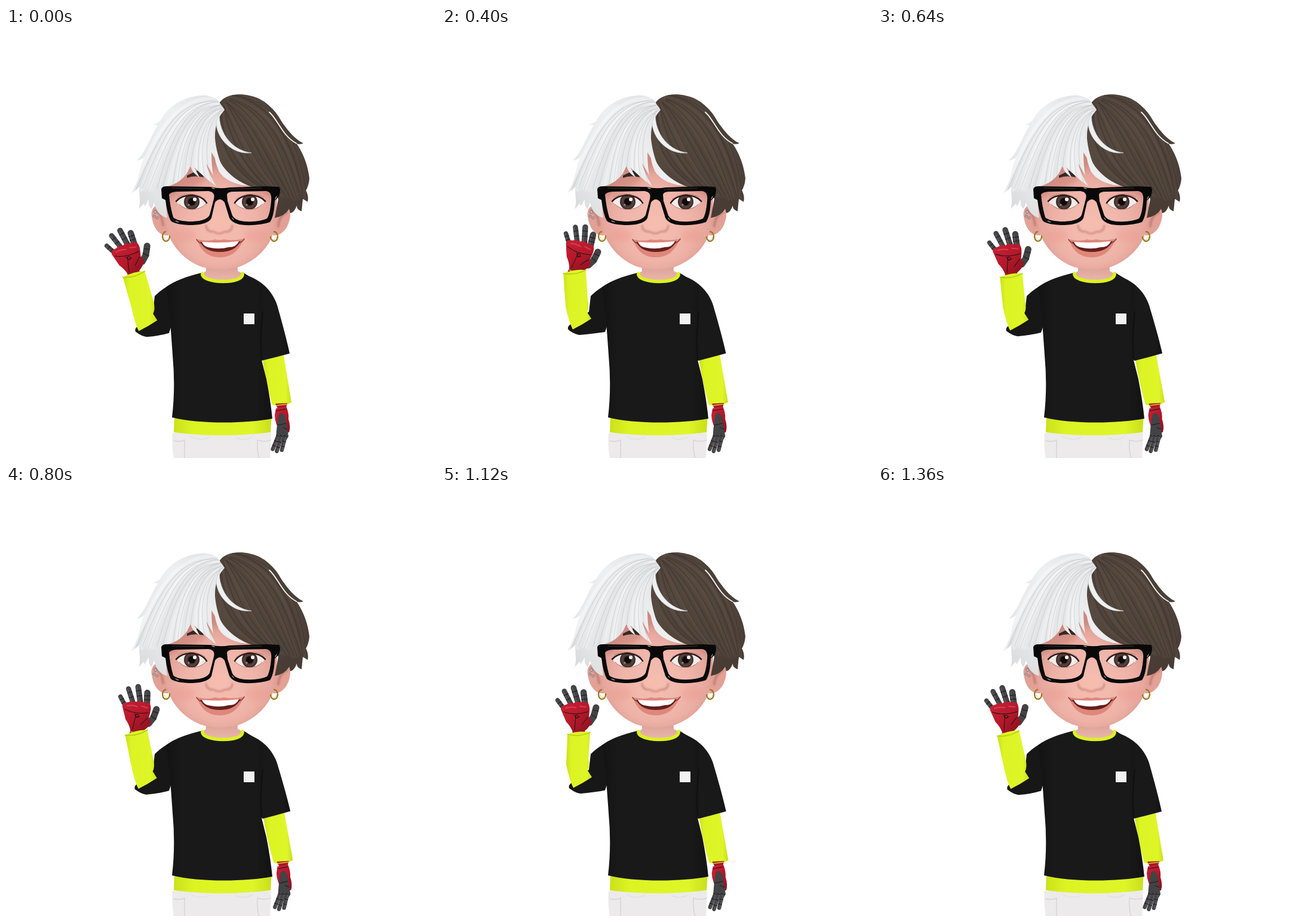
An HTML page for the animation above (1440 ms loop, 720 by 720 pixels).

```html
<!DOCTYPE html>
<html lang="en">
<head>
<meta charset="utf-8">
<title>Waving avatar</title>
<style>
  html, body { margin: 0; width: 100%; height: 100%; overflow: hidden; background: #fff; }
  svg { display: block; width: 100vw; height: 100vh; }
  .lime { fill: url(#lime); }
  .finger { fill: none; stroke: #434346; stroke-linecap: round; stroke-linejoin: round; }
  .seam { fill: none; stroke: #1d1517; stroke-width: 1; }
  .line { fill: none; stroke-linecap: round; }
</style>
</head>
<body>
<svg viewBox="0 0 720 720">
  <defs>
    <linearGradient id="lime">
      <stop offset="0" stop-color="#cbe01a"/><stop offset=".2" stop-color="#dcf423"/>
      <stop offset=".8" stop-color="#def628"/><stop offset="1" stop-color="#c9de1b"/>
    </linearGradient>
    <radialGradient id="skin" gradientUnits="userSpaceOnUse" cx="358" cy="330" r="108">
      <stop offset="0" stop-color="#f5bfb2"/><stop offset=".55" stop-color="#efb4a9"/>
      <stop offset=".8" stop-color="#e6a79d"/><stop offset="1" stop-color="#d6958c"/>
    </radialGradient>
    <linearGradient id="neck" x2="0" y2="1">
      <stop offset="0" stop-color="#c98b83"/><stop offset=".6" stop-color="#e0a89e"/><stop offset="1" stop-color="#ebb7ab"/>
    </linearGradient>
    <linearGradient id="white" x1="1" y1="0" x2="0" y2="1">
      <stop offset="0" stop-color="#dcdee0"/><stop offset=".35" stop-color="#eeeff0"/>
      <stop offset=".7" stop-color="#e6e8e9"/><stop offset="1" stop-color="#d3d6d8"/>
    </linearGradient>
    <linearGradient id="brown" x2=".6" y2="1">
      <stop offset="0" stop-color="#4c4038"/><stop offset=".35" stop-color="#574a40"/><stop offset="1" stop-color="#483c34"/>
    </linearGradient>
    <linearGradient id="cloth">
      <stop offset="0" stop-color="#131313"/><stop offset=".15" stop-color="#191919"/>
      <stop offset=".85" stop-color="#191919"/><stop offset="1" stop-color="#121212"/>
    </linearGradient>
    <linearGradient id="red" x2="1" y2="1">
      <stop offset="0" stop-color="#c92136"/><stop offset=".5" stop-color="#b6192b"/><stop offset="1" stop-color="#85101d"/>
    </linearGradient>
    <radialGradient id="iris">
      <stop offset=".3" stop-color="#2b1d1b"/><stop offset=".7" stop-color="#5a4540"/><stop offset="1" stop-color="#33231f"/>
    </radialGradient>
    <filter id="soft" x="-50%" y="-50%" width="200%" height="200%"><feGaussianBlur stdDeviation="5"/></filter>
    <filter id="mild" x="-50%" y="-50%" width="200%" height="200%"><feGaussianBlur stdDeviation="1.4"/></filter>
    <path id="faceShape" d="M266 230C262 290 265 322 271 342C278 366 300 390 328 400Q358 409 390 400C420 389 441 366 448 342C454 318 456 280 450 230Q360 150 266 230Z"/>
    <path id="whiteShape" d="M358 126C348 108 318 110 293 122C273 132 263 147 258 156Q252 160 246 162L254 163C242 181 235 207 219 222Q229 220 233 215C222 233 227 249 210 276Q219 271 224 265C221 275 227 290 222 303L231 294L232 299L239 287Q238 299 244 303L248 292Q252 313 270 318Q267 295 268 284L263 266Q288 264 303 243L309 231Q312 243 324 250L315 233Q332 250 352 265Q338 242 335 226L347 247Q344 230 344 208Q357 228 356 240L366 243Q352 210 350 185Q349 155 366 137Z"/>
    <path id="brownShape" d="M357 126C367 109 399 107 425 119C447 131 461 151 467 171C492 194 505 223 508 252Q507 264 502 272Q507 281 505 291L497 286Q496 296 495 307Q486 304 487 297Q483 309 476 310L474 303Q467 315 450 318L456 286L445 268L433 273Q382 259 364 233C348 213 347 182 351 162Q354 147 365 137Z"/>
    <clipPath id="faceClip"><use href="#faceShape"/></clipPath>
    <clipPath id="whiteClip"><use href="#whiteShape"/></clipPath>
    <clipPath id="brownClip"><use href="#brownShape"/></clipPath>
  </defs>

  <!-- trousers and shirt -->
  <path fill="#eceaea" d="M279 678H444L442 720H281Q277 700 279 678Z"/>
  <g class="line" stroke="#d8d5d5" stroke-width="1.5">
    <path d="M281 691Q290 694 299 690V720M421 690Q433 694 443 690M421 690Q420 710 424 720"/>
    <path d="M310 684Q320 692 340 686M385 686Q398 692 412 685" opacity=".5"/>
  </g>
  <path class="lime" d="M282 648L281 677Q360 687 443 677L445 648Z"/>

  <g id="sideArm">
    <path class="lime" d="M429 550L464 543Q471 585 478 627Q463 635 446 631Q436 598 429 550Z"/>
    <path d="M451 629L471 628L469 635L455 637Z" fill="#a01525"/>
    <path class="line" d="M453 632L470 630" stroke="#d6a22d" stroke-width="2"/>
    <path fill="url(#red)" d="M452 637L469 633Q474 645 473 655Q477 668 474 677L462 680Q450 664 450 648Z"/>
    <path fill="#434346" d="M457 647Q464 641 468 652L473 684L468 692L452 688Q453 665 457 647Z"/>
    <g id="restFingers"></g>
    <path class="seam" d="M452 641L469 638M464 669L471 672M455 665L469 662"/>
    <path fill="url(#cloth)" d="M403 414C434 425 448 446 454 464Q468 513 475 545Q453 551 428 557L398 470Z"/>
  </g>

  <path id="upperArm" fill="#171717"/>
  <path fill="url(#cloth)" d="M327 410C303 416 282 423 268 434C273 464 276 504 279 548Q284 602 278 652C320 663 400 663 446 654Q443 624 436 588L428 556L430 430L398 410Q365 437 327 410Z"/>
  <path class="line" d="M430 475Q425 515 428 555" stroke="#101010" stroke-width="2"/>
  <rect x="398" y="478" width="18" height="18" fill="#f2f2f2"/>

  <!-- neck -->
  <path fill="url(#neck)" d="M334 382H387L388 407Q398 411 396 415Q363 432 329 415Q328 411 335 407Z"/>
  <path class="line" d="M329 411C326 428 399 430 396 411" stroke="#d9f222" stroke-width="5.5"/>

  <!-- ears -->
  <path fill="#e3a196" d="M270 302C253 289 241 301 244 316C247 337 258 349 272 347Z"/>
  <path fill="#e3a196" d="M449 311C466 295 477 300 476 314C474 335 461 349 447 347Z"/>
  <path class="line" d="M250 305Q261 311 263 330M470 309Q457 315 456 332" stroke="#c27f76" stroke-width="4" filter="url(#mild)"/>
  <g fill="#b9bcc3" stroke="#696469" stroke-width=".8">
    <circle cx="250" cy="308" r="2.5"/><circle cx="248" cy="315" r="2"/><circle cx="253" cy="318" r="2"/>
  </g>

  <!-- face -->
  <use href="#faceShape" fill="url(#skin)"/>
  <g clip-path="url(#faceClip)" filter="url(#soft)">
    <path d="M260 225Q350 180 455 225L452 284Q385 268 350 230Q330 272 265 284Z" fill="#c47c72" opacity=".5"/>
    <ellipse cx="298" cy="348" rx="19" ry="12" fill="#ec9a8f" opacity=".45"/>
    <ellipse cx="420" cy="348" rx="19" ry="12" fill="#ec9a8f" opacity=".45"/>
    <path d="M274 350Q300 407 358 407Q418 407 446 350L450 410H270Z" fill="#c8877f" opacity=".4"/>
  </g>
  <path d="M303 247L326 236L331 250Q315 246 303 251Z" fill="#342923"/>
  <g id="eyes"></g>
  <path d="M335 331Q336 342 348 341Q357 347 366 341Q378 342 379 331" class="line" stroke="#c67a70" stroke-width="3" opacity=".7" filter="url(#mild)"/>
  <ellipse cx="357" cy="326" rx="14" ry="11" fill="#f6bcae" filter="url(#mild)"/>
  <path fill="#df877b" d="M320 354Q339 358 350 354Q357 356 365 354Q380 357 398 353C390 374 377 384 358 384C339 384 326 374 320 354Z"/>
  <path fill="#65201c" d="M325 358Q358 362 393 357C386 370 374 375 358 375C342 375 331 370 325 358Z"/>
  <path fill="#fff" d="M328 358Q358 361 390 357Q386 367 373 367Q358 371 343 368Q331 367 328 358Z"/>
  <path class="line" d="M319 354Q322 359 327 361M399 353Q396 358 391 360" stroke="#93423c" stroke-width="1.5"/>
  <g class="line" stroke-width="2.4" stroke="#9b7b28">
    <path d="M267 341A6 8 0 1 0 274 348"/><path d="M449 341A6 8 0 1 1 443 350"/>
    <path d="M265 350Q267 357 272 354M453 350Q450 357 446 354" stroke="#dfc66b" stroke-width="1"/>
  </g>

  <!-- hair -->
  <use href="#brownShape" fill="url(#brown)"/>
  <g id="brownHair" clip-path="url(#brownClip)"></g>
  <path fill="#4b4037" d="M430 122C459 143 469 179 498 193Q490 197 480 190C463 177 458 155 430 122Z"/>
  <path class="line" d="M441 141C455 153 463 181 486 193" stroke="#f4f4f4" stroke-width="1.8"/>
  <use href="#whiteShape" fill="url(#white)"/>
  <g id="whiteHair" clip-path="url(#whiteClip)"></g>
  <path d="M358 138C353 169 375 205 411 209C378 213 352 184 352 158Z" fill="#eef0f1" stroke="#c9cccf" stroke-width=".7"/>
  <path d="M350 190C350 220 368 247 405 264C385 263 366 254 358 242C350 228 347 210 350 190Z" fill="#eceeef"/>

  <!-- glasses -->
  <path fill="#090909" fill-rule="evenodd" d="M260 270Q261 265 269 265L342 266Q358 270 374 267L436 265L457 266Q461 269 457 282L450 289Q449 315 442 325Q425 331 400 330Q380 329 374 318L366 292Q358 282 350 292L344 318Q339 329 312 330Q285 330 276 323Q270 312 267 288L261 285Z
    M273 279Q275 275 285 274L339 273Q351 275 348 286L341 313Q336 323 312 324Q287 324 280 317Q275 300 273 279Z
    M370 279Q371 274 382 274L435 273Q446 274 444 290Q442 312 437 319Q425 325 402 324Q384 323 379 314L371 290Z"/>
  <path class="line" d="M278 268L331 269M372 270L428 268" stroke="#343434"/>
  <g class="line" stroke="#ddd"><path d="M345 268L349 269M451 286L453 282M284 323L289 325M379 318L381 321"/></g>

  <!-- raised arm -->
  <g id="hand">
    <path d="M-10 -5H10L12 6H-11Z" fill="#8f1421"/>
    <path class="line" d="M-9 0Q0 3 9 0" stroke="#cf9a2c" stroke-width="2"/>
    <g id="fingers"></g>
    <g id="thumb">
      <path class="finger" stroke-width="11" d="M18 -18L25 -28L29 -43"/>
      <path class="seam" d="M20 -32L30 -26M24 -39L33 -37"/>
    </g>
    <path fill="url(#red)" d="M-30 -40Q-29 -47 -21 -48L-16 -51L-9 -50Q-4 -55 2 -52L14 -52Q19 -47 18 -37L17 -27L22 -20Q18 -10 10 -4Q0 -1 -10 -2Q-14 -12 -21 -19Z"/>
    <path class="seam" d="M-26 -36Q-8 -29 16 -36M-5 -31L-7 -4M15 -27L5 -14M-8 -31L-3 -25L2 -28"/>
    <circle cx="-3" cy="-28" r="2.5" class="seam"/>
    <path class="line" d="M-22 -42Q-14 -45 -5 -43M2 -45L12 -44" stroke="#ef6575" stroke-width="2" opacity=".5"/>
  </g>
  <path id="forearm" class="lime"/>
  <path id="cuff" class="line" stroke="#b4c716" stroke-width="1.5"/>
</svg>
<script>
const STEP = 80, LOOP = 1440;
// turning points of the wave: time, wrist x, hand tilt
const wave = [
  [0, 214, -11], [240, 229, 0], [400, 222, 20], [560, 212, -12], [640, 223, -1],
  [800, 218, 9], [960, 206, -13], [1120, 229, 0], [1360, 218, -1], [LOOP, 214, -11]
];
const $ = id => document.getElementById(id);
const add = (id, markup) => $(id).insertAdjacentHTML('beforeend', markup);
const mix = (a, b, k) => a + (b - a) * k;

let seed = 7;
const random = () => (seed = seed * 16807 % 2147483647) / 2147483647;

// soft strands blended between two cubic curves, with fine lines on top
function hair(id, a, b, tones, crease) {
  const strand = (k, color, width, alpha) => {
    const p = a.map((v, j) => (mix(v, b[j], k) + random() * 6 - 3).toFixed(1));
    return `<path class="line" d="M${p[0]} ${p[1]}C${p.slice(2)}" stroke="${color}" stroke-width="${width}" opacity="${alpha}"/>`;
  };
  let wide = '', fine = '';
  for (let i = 0; i < 24; i++) {
    wide += strand((i + random()) / 24, tones[i % tones.length], 4 + 4 * random(), .5);
    if (i % 2) fine += strand(i / 24, crease, 1.2, .6);
  }
  add(id, `<g filter="url(#mild)">${wide}</g>${fine}`);
}

function eye(x, dir) {
  add('eyes', `<g transform="translate(${x} 292) scale(${dir} 1)">
    <path d="M-25 -1C-14 -15 14 -16 25 1C15 16 -13 17 -25 -1Z" fill="#f3ebe9"/>
    <circle cy="-1" r="13" fill="url(#iris)"/><circle cy="-1" r="6" fill="#110b0b"/>
    <path class="line" d="M-26 -2C-14 -15 14 -16 25 1" stroke="#2a1916" stroke-width="2.6"/>
    <path class="line" d="M-21 3C-11 15 13 15 24 2" stroke="#a8675e"/>
    <path class="line" d="M-23 -9Q0 -20 22 -6" stroke="#bd766d" stroke-width="1.3" opacity=".7"/></g>
    <circle cx="${x + 5}" cy="287" r="3" fill="#fff"/><circle cx="${x - 5}" cy="296" r="1.6" fill="#a58c84"/>`);
}

function finger(id, x, y, angle, length, width) {
  const joints = [.05, .42, .75].map(k => `M${-width / 2} ${-length * k}h${width}`).join('');
  add(id, `<g transform="translate(${x} ${y}) rotate(${angle})">
    <path class="finger" stroke-width="${width}" d="M0 0V${-length}"/>
    <path class="line" stroke="#5b5b5f" stroke-width="1.5" d="M${-width / 5} 0V${-length}"/>
    <path class="seam" d="${joints}"/></g>`);
}

function build() {
  eye(311, 1);
  eye(408, -1);
  hair('whiteHair', [357, 121, 290, 112, 252, 170, 210, 272], [362, 140, 335, 160, 330, 215, 354, 265],
    ['#fff', '#d6d9db', '#f6f7f7', '#e3e5e7'], '#c3c7ca');
  hair('brownHair', [360, 135, 345, 190, 365, 245, 436, 274], [380, 112, 470, 120, 500, 200, 508, 290],
    ['#62554b', '#453a32', '#5b4e44', '#4c4138'], '#3a3029');
  for (let i = 0; i < 4; i++)
    finger('fingers', -24 + 11.5 * i, -40 - 11 * Math.sin(i * .75), -37 + 10 * i, 19 + 8 * Math.sin(i), 7.5 + i);
  for (let i = 0; i < 3; i++)
    finger('restFingers', 456 + 6 * i, 682, 202 - 4 * i, 25 + 3 * Math.sin(i * 1.5), 6.5);
}

function pose(t) {
  const i = wave.findIndex(k => k[0] > t);
  const [from, to] = [wave[i - 1], wave[i]];
  const k = (t - from[0]) / (to[0] - from[0]);
  return [mix(from[1], to[1], k), mix(from[2], to[2], k)];
}

function draw(time) {
  const t = Math.floor(time / STEP) * STEP;
  const [x, tilt] = pose(t);
  const lift = tilt * tilt / 100;
  const y = 414 - 1.5 * lift;
  const bx = (214 - x) / 3 - lift, by = bx * .6;
  const ex = 239 + bx * .6, ey = 499 + bx * .5;
  const len = Math.hypot(ex - x, ey - y);
  const nx = (ey - y) / len * 19, ny = (x - ex) / len * 19;
  const left = `${x - nx} ${y - ny}`, right = `${x + nx} ${y + ny}`;

  $('hand').setAttribute('transform', `translate(${x} ${y}) rotate(${tilt})`);
  $('thumb').setAttribute('transform', `rotate(${-tilt * .4} 18 -18)`);
  $('forearm').setAttribute('d', `M${left}Q${x} ${y - 5} ${right}L${ex + 9} ${ey - 40}Q${ex + 12} ${ey - 28} ${ex + 8} ${ey - 20}L${ex + 15} ${ey - 9}Q${ex} ${ey + 1} ${ex - 16} ${ey + 9}Q${ex - 22} ${ey - 2} ${ex - 28} ${ey - 30}Z`);
  $('cuff').setAttribute('d', `M${left}Q${x + 1} ${y + 7} ${right}`);
  $('upperArm').setAttribute('d', `M300 420C282 424 260 437 249 449L246 475L${222 + bx} ${500 + by}Q${216 + bx} ${504 + by} ${218 + bx} ${509 + by}Q${228 + bx} ${517 + by} ${237 + bx} ${518 + by}Q${260 + bx} ${516 + by} 273 ${511 + by * .5}L286 470Z`);

  const sway = -.9 * Math.max(0, Math.sin(Math.PI * (t - 260) / 1080));
  $('sideArm').setAttribute('transform', `rotate(${sway} 450 470)`);
}

build();
const start = performance.now();
function tick() {
  draw((performance.now() - start) % LOOP);
  requestAnimationFrame(tick);
}
tick();
</script>
</body>
</html>
```
